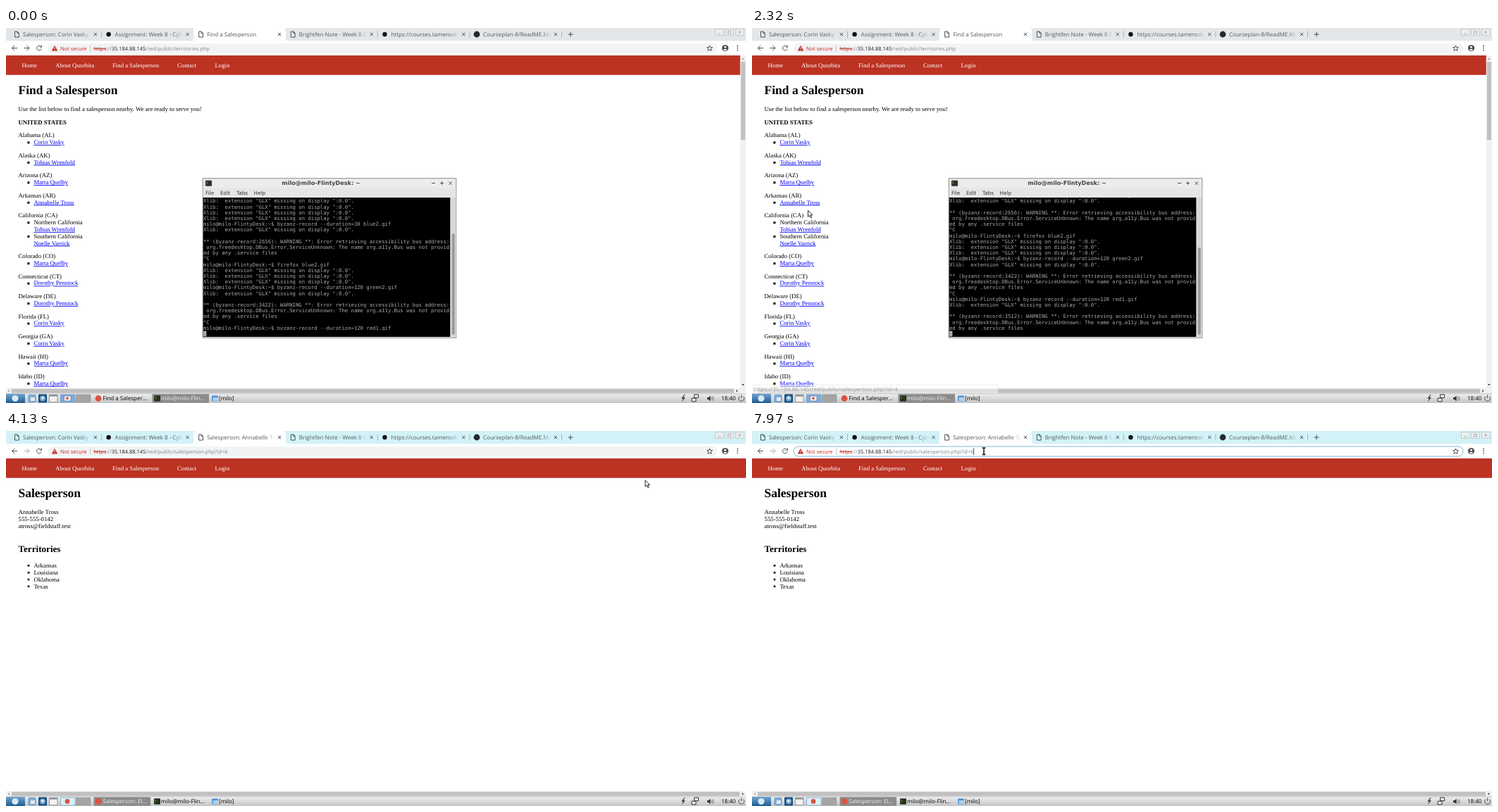
Animation, 1050 px wide and 533 px high, one loop 8 s. Source, as an HTML page:

```html
<!DOCTYPE html>
<html lang="en">
<head>
<meta charset="utf-8">
<title>Find a Salesperson</title>
<style>
html, body { margin: 0; width: 100%; height: 100%; overflow: hidden; background: #fff; }
svg { display: block; width: 100vw; height: 100vh; }
text { white-space: pre; text-rendering: geometricPrecision; }
.ui { font: 8px "Open Sans", "Noto Sans", sans-serif; }
.url { font: 7.45px "Open Sans", "Noto Sans", sans-serif; }
.page { font: 8.75px "Liberation Serif", serif; }
.bold { font-weight: bold; }
.h1 { font: bold 17.5px "Liberation Serif", serif; }
.h2 { font: bold 13.12px "Liberation Serif", serif; }
.link { fill: #00e; text-decoration: underline; }
.mono { font: 7.267px "DejaVu Sans Mono", monospace; fill: #aaa; }
.menu { font: 7.3px "DejaVu Sans", sans-serif; fill: #333; }
.title { font: bold 8.07px "DejaVu Sans", sans-serif; fill: #444; }
.line { fill: none; stroke: #4a4d51; stroke-width: 1; }
</style>
</head>
<body>
<svg id="stage" viewBox="0 0 1050 533" preserveAspectRatio="none">
  <defs>
    <linearGradient id="fade" gradientUnits="userSpaceOnUse" x1="106" x2="121">
      <stop stop-color="#53575c"/><stop offset="1" stop-color="#53575c" stop-opacity="0"/>
    </linearGradient>
    <linearGradient id="panel" x2="0" y2="1">
      <stop stop-color="#efeff0"/><stop offset="1" stop-color="#c3c4c7"/>
    </linearGradient>
    <linearGradient id="start" x2="0" y2="1">
      <stop stop-color="#6ea5d2"/><stop offset="1" stop-color="#1f5b90"/>
    </linearGradient>
    <clipPath id="rows"><rect x="279" y="241" width="352" height="189"/></clipPath>
  </defs>
</svg>
<script>
const LOOP = 8000;
const CLICK = 2650, LOADED = 2960, FOCUS = 6960, DESELECT = 7510;
const HOST = '35.184.88.145';
const SALES = '/red/public/salesperson.php?id=';
const SHELL = 'milo@milo-FlintyDesk:~$ ';

const rect = (x, y, w, h, fill, more = '') =>
  `<rect x="${x}" y="${y}" width="${w}" height="${h}" fill="${fill}" ${more}/>`;
const path = (d, more = 'class="line"') => `<path d="${d}" ${more}/>`;
const dot = (x, y, r, fill, more = '') => `<circle cx="${x}" cy="${y}" r="${r}" fill="${fill}" ${more}/>`;
const text = (x, y, cls, str, more = '') => `<text x="${x}" y="${y}" class="${cls}" ${more}>${str}</text>`;
const group = (id, ...parts) => `<g id="${id}">${parts.join('')}</g>`;

// Browser frame
function tabs() {
  const titles = ['Salesperson: Corin Vasky', 'Assignment: Week 8 - Cybersecurity', '',
    'Brightfen Note - Week 8 Course', 'https://courses.tamerook', 'Courseplan-8/ReadME.Md'];
  const marks = { 1: '#111', 4: '#111', 5: '#24292e' };
  const pageIcon = path('M12.5 5h3.6l2.2 2.2v5.8h-5.8zM16 5v2.3h2.3', 'class="line" stroke-width=".8"');
  const spinner = dot(15.6, 9, 3.8, 'none', 'id="spinner" stroke="#4285d8" stroke-width="1.2" stroke-dasharray="15 9"');
  return titles.map((title, i) => `<g transform="translate(${130.6 * i})">` +
    (marks[i] ? dot(15, 9, i === 5 ? 4.4 : 3.2, marks[i]) : i === 2 ? group('tabIcon', pageIcon) + spinner : pageIcon) +
    text(24, 12, 'ui', title, `fill="url(#fade)" ${i === 2 ? 'id="tabTitle"' : ''}`) +
    path('M124.7 6.8l4.4 4.4m0-4.4l-4.4 4.4') +
    (i === 1 || i === 2 ? '' : path('M135.5 4.5v9', 'stroke="#9aa3aa" stroke-width=".8"')) + '</g>').join('');
}

const windowButtons = [1012, 1026.5, 1041].map((x, i) =>
  rect(x - 5.5, 1.5, 11.5, 9, '#eceff0', 'stroke="#b9bec1" stroke-width=".7"') +
  path([`M${x - 2} 8h4`, `M${x - 2} 4h4v4h-4z`, `M${x - 2} 4l4 4m0-4l-4 4`][i],
    'fill="none" stroke="#a5aaae"')).join('');

const browser =
  rect(0, 0, 1050, 18.5, '#e3e7ea', 'id="strip"') +
  path('M262 18.5q4 0 4-4V4q0-4 4-4h123q4 0 4 4v10.5q0 4 4 4z', 'fill="#fff"') +
  tabs() + path('M797.5 9h7m-3.5-3.5v7') + windowButtons +
  rect(0, 18.5, 1050, 20.5, '#fff') +
  path('M16 28.5H8.5m3.6-3.6l-3.6 3.6 3.6 3.6') +
  path('M25.5 28.5H33m-3.6-3.6l3.6 3.6-3.6 3.6', 'class="line" id="forward"') +
  path('M49.6 26.4a3.4 3.4 0 1 0 .6 3M50.4 24.4v2.8h-2.8') +
  rect(59, 22, 950, 14, '#f1f3f4', 'rx="7" id="omnibox"') +
  path('M69 24.8l4.2 7.6h-8.4z', 'fill="#c5281c"') + rect(68.6, 27.2, .9, 2.6, '#fff') + rect(68.6, 30.4, .9, 1, '#fff') +
  text(77, 31.6, 'url', 'Not secure', 'fill="#c5281c"') +
  rect(119.3, 24.5, .8, 9, '#b4b8bb') +
  rect(124, 24, 191, 10.5, '#cbe2f8', 'id="selection"') +
  text(124.3, 31.6, 'url', `<tspan fill="#c5281c" text-decoration="line-through">https</tspan><tspan fill="#80868b">://</tspan>` +
    `<tspan fill="#202124">${HOST}</tspan><tspan id="urlPath" fill="#80868b"></tspan>`) +
  rect(314.3, 24.5, .8, 9.5, '#222', 'id="caret"') +
  path('M998.5 24.9l1.1 2.6 2.8.2-2.1 1.8.7 2.8-2.5-1.5-2.5 1.5.7-2.8-2.1-1.8 2.8-.2z', 'class="line" stroke-width=".8"') +
  dot(1020.5, 28.5, 4.6, '#4a4d51') + dot(1020.5, 27, 1.5, '#fff') + path('M1017.8 31q2.7-2.4 5.4 0-2.7 2.3-5.4 0z', 'fill="#fff"') +
  [25.4, 28.5, 31.6].map(y => dot(1038, y, .9, '#4a4d51')).join('');

// Web pages
const nav = rect(0, 39, 1050, 27.7, '#bc3223') +
  [[22.5, 'Home'], [70, 'About Quorbita'], [151, 'Find a Salesperson'], [243, 'Contact'], [296.5, 'Login']]
    .map(([x, label]) => text(x, 56.3, 'page', label, 'fill="#fff"')).join('');

function listPage() {
  const [corin, tobias, marta, anna] = ['Corin Vasky', 'Tobias Wrenfold', 'Marta Quelby', 'Annabelle Tross'];
  const dorothy = 'Dorothy Penstock';
  const states = [['Alabama (AL)', corin], ['Alaska (AK)', tobias], ['Arizona (AZ)', marta], ['Arkansas (AR)', anna],
    ['California (CA)', '-Northern California', tobias, '-Southern California', 'Noelle Varrick'],
    ['Colorado (CO)', marta], ['Connecticut (CT)', dorothy], ['Delaware (DE)', dorothy], ['Florida (FL)', corin],
    ['Georgia (GA)', corin], ['Hawaii (HI)', marta], ['Idaho (ID)', marta]];
  let y = 155.3, out = '';
  for (const [state, ...items] of states) {
    out += text(17.5, y, 'page', state);
    for (const item of items) {
      y += 9.84;
      const region = item[0] === '-';
      if (region || items.length === 1) out += rect(30.4, y - 3.8, 3, 3, '#000');
      out += text(39.4, y, region ? 'page' : 'page link', item.replace('-', ''));
    }
    y += 18.63;
  }
  return text(17.5, 94, 'h1', 'Find a Salesperson') +
    text(17.5, 118, 'page', 'Use the list below to find a salesperson nearby. We are ready to serve you!') +
    text(17.5, 136.7, 'page bold', 'UNITED STATES') + out;
}

const personPage = text(17.5, 94, 'h1', 'Salesperson') +
  ['Annabelle Tross', '555-555-0142', 'atross@fieldstaff.test']
    .map((s, i) => text(17.5, 118 + 9.84 * i, 'page', s)).join('') +
  text(17.5, 172.4, 'h2', 'Territories') +
  ['Arkansas', 'Louisiana', 'Oklahoma', 'Texas'].map((s, i) =>
    dot(32, 191.3 + 9.84 * i, 1.5, '#000') + text(39.4, 194 + 9.84 * i, 'page', s)).join('');

const vScroll = rect(1041.7, 39, 8.3, 473, '#f1f1f1') + rect(1042.8, 48, 6.1, 111, '#c1c1c1') +
  path('M1043.8 45l2-2.4 2 2.4z', 'fill="#a3a3a3"') + path('M1043.8 506l2 2.4 2-2.4z', 'fill="#505050"');
const hScroll = rect(0, 511.7, 1050, 8.2, '#f1f1f1') +
  rect(8, 512.8, 1033, 6, '#c1c1c1', 'id="hThumb"') +
  path('M5 513.8l-2.4 2 2.4 2z', 'fill="#a3a3a3"') +
  path('M1044.5 513.8l2.4 2-2.4 2z', 'fill="#505050" id="hArrow"');
const status = rect(-1, 507.3, 350, 12.6, '#fff', 'stroke="#d5d8da" stroke-width=".8"') +
  text(2, 516.3, 'ui', '', 'id="statusText" fill="#6b6f73"');

// Terminal window
function terminal() {
  const xlib = 'Xlib:  extension "GLX" missing on display ":0.0".';
  const warning = pid => ['', `** (byzanz-record:${pid}): WARNING **: Error retrieving accessibility bus address:`,
    ' org.freedesktop.DBus.Error.ServiceUnknown: The name org.a11y.Bus was not provid', 'ed by any .service files'];
  const record = args => `${SHELL}byzanz-record --duration=${args}`;
  const lines = [xlib, xlib, xlib, xlib, record('30 blue2.gif'), xlib, ...warning(2656), '^C',
    SHELL + 'firefox blue2.gif', xlib, xlib, xlib, record('120 green2.gif'), xlib, ...warning(3422), '^C',
    record('120 red1.gif'), xlib, ...warning(3512)];
  return rect(279.2, 213.7, 359.6, 226.6, '#ececec', 'stroke="#808080" stroke-width=".9"') +
    rect(279.7, 227.5, 358.6, 13.5, '#e6e6e6') +
    rect(283, 216.7, 9, 8, '#26331f', 'rx="1" stroke="#777" stroke-width=".5"') + path('M284.5 219l1.6 1.2-1.6 1.2', 'fill="none" stroke="#8fbf5f" stroke-width=".8"') +
    text(447, 223.3, 'title', 'milo@milo-FlintyDesk: ~', 'text-anchor="middle"') +
    path('M604 220.5h5m7 0h5m-2.5-2.5v5m10-4.6l4.4 4.4m0-4.4l-4.4 4.4') +
    [[283, 'File'], [304, 'Edit'], [327, 'Tabs'], [351.5, 'Help']].map(([x, s]) => text(x, 237.2, 'menu', s)).join('') +
    rect(279.7, 241, 350.8, 198, '#000') + rect(630.5, 241, 7.9, 198, '#d8d8d8') +
    rect(632.7, 292, 4, 144, '#9a9a9a', 'rx="2" id="termThumb"') +
    `<g clip-path="url(#rows)"><g id="buffer">${lines.map((s, i) => text(280, 248.3 + 8.2 * i, 'mono', s)).join('')}</g></g>` +
    rect(280, 430.6, 4.4, 7.7, '#aaa');
}

// Taskbar
const panel = rect(0, 519.7, 1050, 13.3, 'url(#panel)') + path('M0 519.8h1050', 'stroke="#a9abae" stroke-width=".6"') +
  rect(0, 520, 27, 13, 'url(#start)') + dot(13, 526.5, 4.6, '#d8e8f5') +
  rect(32, 521.5, 10, 10, '#7fb0dc', 'rx="1" stroke="#4e81b0" stroke-width=".7"') + rect(35, 525, 6, 5, '#dfeaf4') +
  rect(46, 520.5, 12, 12, '#1d4f80', 'rx="1"') + dot(52, 526.5, 4, '#6fa7d6') + path('M49.5 525l3-1.5 2 2-2.5 3.4z', 'fill="#dcebd7"') +
  rect(61.5, 521.3, 11.5, 10.5, '#f2f2f3', 'stroke="#777" stroke-width=".7"') + rect(61.5, 521.3, 11.5, 2.3, '#8a8f95') +
  rect(77.3, 521, 20.7, 11, '#79abe0', 'id="pager" stroke="#6c94bd" stroke-width=".6"') +
  rect(82.5, 523, 9.5, 7, '#f2f2f2', 'id="pagerWindow" stroke="#557" stroke-width=".5"') + dot(87, 526.4, 2.8, '#d9503f', 'id="pagerDot"') +
  rect(99.3, 521, 20.7, 11, '#a5a5a5', 'stroke="#8b8b8b" stroke-width=".5"') +
  rect(124.5, 520.3, 80.5, 12.4, '#8c8c8c', 'rx="1" id="browserButton"') +
  rect(207.5, 520.3, 80.5, 12.4, '#8c8c8c', 'rx="1" id="termButton"') +
  dot(131, 526.5, 4.4, '#db5243') + text(137.3, 529.4, 'ui', '', 'id="browserTask"') +
  rect(210, 522.3, 9, 8.5, '#26331f', 'rx="1"') + path('M211.5 524.5l1.6 1.2-1.6 1.2', 'fill="none" stroke="#8fbf5f" stroke-width=".8"') +
  text(220, 529.4, 'ui', 'milo@milo-Flin...', 'id="termTask"') +
  rect(292, 522.5, 9, 8, '#4a93d8', 'rx="1"') + rect(293.5, 525, 7.5, 5, '#a9d0f2') + text(302, 529.4, 'ui', '[milo]') +
  path('M962.5 521l-4.2 5.5h2.6l-2 5 5-6.2h-2.8l2.4-4.3z', 'fill="#333"') +
  path('M976.5 521h6v4.6h-6zM973 526.2h6v4.6h-6z', 'fill="#eee" stroke="#333"') +
  path('M995 525h2l2.6-2.5v8l-2.6-2.5h-2z', 'fill="#333"') +
  path('M1001.2 524.5q1.5 2 0 4M1003 523.3q2.3 3.2 0 6.4', 'fill="none" stroke="#555" stroke-width=".8"') +
  text(1015, 529.4, 'ui', '18:40') +
  path('M1041.2 523.3a3.9 3.9 0 1 0 4.6 0M1043.5 521.5v4.6', 'class="line" stroke-width=".9"');

// Pointers, each with its hot spot at the origin
const pointer = group('pointer',
  path('M0 0v9l2.1-1.9 1.5 3.4 1.6-.7-1.5-3.3h2.8z', 'id="arrow" fill="#fff" stroke="#111" stroke-width=".9"'),
  path('M-1 .3q.8-.7 1.4 0l.8 3 3.8.4q1.2.2 1.1 1.4l-.5 3.6h-6.2l-2.6-3.4q.2-1.2 1.6-.4l.9.6z',
    'id="hand" fill="#fff" stroke="#111" stroke-width=".9"'),
  path('M-2.3-4.8h4.6M-2.3 4.8h4.6M0-4.8v9.6', 'id="beam" fill="none" stroke="#111" stroke-width="1.5"'));

stage.innerHTML += browser + nav + group('list', listPage()) + group('person', personPage) + hScroll +
  group('vScroll', vScroll) + group('term', terminal()) + group('status', status) + panel + pointer;

const el = id => document.getElementById(id);
const show = (id, on) => el(id).setAttribute('display', on ? 'inline' : 'none');
const set = (id, name, value) => el(id).setAttribute(name, value);
const say = (id, str) => { if (el(id).textContent !== str) el(id).textContent = str; };
const ramp = (t, from, to) => Math.max(0, Math.min(1, (t - from) / (to - from)));

// time, x, y
const route = [[40, 330, 300], [300, 20, 139], [480, 20, 139], [1120, 85, 260], [1220, 83, 254], [1330, 83, 254],
  [1490, 79, 287], [1850, 79, 287], [2100, 80, 260], [2320, 79.5, 259.3], [2480, 79.5, 247.3], [3340, 79.5, 247.3],
  [4130, 907, 70], [6299, 907, 70], [6300, 482, 1], [6850, 332, 28.8], [7130, 329, 28.8], [LOOP, 329, 28.8]];

function pointerAt(t) {
  const i = route.findIndex(p => p[0] > t);
  if (i <= 0) return route[0].slice(1);
  const [t0, x0, y0] = route[i - 1], [t1, x1, y1] = route[i];
  const k = ramp(t, t0, t1), e = k * k * (3 - 2 * k);
  return [x0 + (x1 - x0) * e, y0 + (y1 - y0) * e];
}

function draw(t) {
  const active = t >= CLICK, loaded = t >= LOADED, focused = t >= FOCUS;
  show('list', !loaded);
  show('vScroll', !loaded);
  show('person', loaded);
  show('term', !active);
  set('strip', 'fill', active ? '#d2f2f7' : '#e3e7ea');
  set('forward', 'opacity', loaded ? .45 : 1);
  set('hThumb', 'width', loaded ? 1033 : 1025);
  set('hArrow', 'transform', `translate(${loaded ? 0 : -8.3})`);
  say('tabTitle', loaded ? 'Salesperson: Annabelle Tross' : 'Find a Salesperson');
  say('urlPath', loaded ? SALES + 6 : '/red/public/territories.php');

  const loading = active && t < 3080;
  show('spinner', loading);
  show('tabIcon', !loading);
  set('spinner', 'transform', `rotate(${t * .36} 15.6 9)`);

  const scroll = t < 80 ? 0 : t < 260 ? 1 : 5;
  set('buffer', 'transform', `translate(0 ${-8.2 * scroll})`);
  set('termThumb', 'y', 292 + 4 * scroll);
  set('termThumb', 'height', 144 - 4 * scroll);

  say('browserTask', loaded ? 'Salesperson: El...' : 'Find a Salesper...');
  set('browserTask', 'fill', active ? '#eee' : '#000');
  set('termTask', 'fill', active ? '#000' : '#eee');
  show('browserButton', active);
  show('termButton', !active);
  set('pager', 'fill', active ? '#d9f0f6' : '#79abe0');
  show('pagerWindow', !active);
  set('pagerDot', 'r', active ? 3.4 : 1.8);

  set('omnibox', 'fill', focused ? '#fff' : '#f1f3f4');
  set('omnibox', 'stroke', focused ? '#7fb9dc' : 'none');
  show('selection', focused && t < DESELECT);
  show('caret', t >= DESELECT);

  // The status bubble fades in on hover and lingers before fading out
  const second = t >= 2440;
  say('statusText', `https://${HOST}${SALES}${second ? 6 : 4}`);
  set('status', 'opacity', second ? ramp(t, 2440, 2540) * ramp(t, 3790, 3590)
    : ramp(t, 1610, 1730) * ramp(t, 2430, 2210));

  const [x, y] = pointerAt(t);
  const onList = t > 480 && !loaded;
  const overLink = onList && ((y > 242 && y < 252.5) || (y > 280.5 && y < 291)) && x > 39 || (loaded && t < 3380);
  const overUrl = t > 6300 && y > 22;
  show('pointer', t >= 40);
  set('pointer', 'transform', `translate(${x} ${y})`);
  show('hand', overLink);
  show('beam', overUrl);
  show('arrow', !overLink && !overUrl);
}

function tick() {
  draw(performance.now() % LOOP);
  requestAnimationFrame(tick);
}
tick();
</script>
</body>
</html>
```
